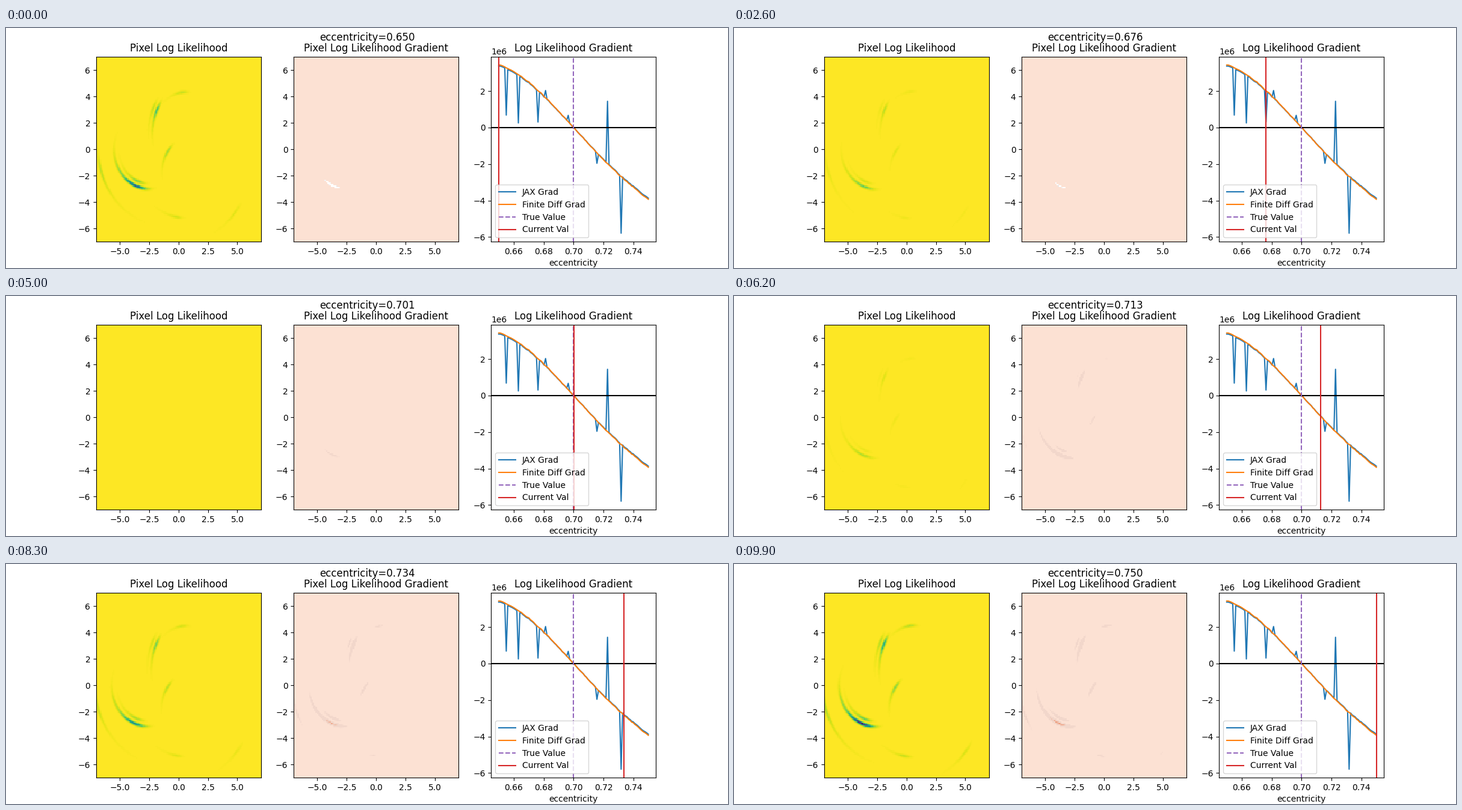
Recreate the animation shown at these times as a matplotlib script. Size 1200x400 px, loop 10 s.

```python
import numpy as np
import matplotlib.pyplot as plt
from matplotlib.animation import FuncAnimation
from matplotlib.colors import LinearSegmentedColormap

FRAMES = 100
TRUE_ECC = 0.7
GRID, HALF = 128, 7.0
THICK = 0.075
PX = 72 / 100  # one pixel in points

ecc = np.linspace(0.65, 0.75, FRAMES)
offset = (ecc - TRUE_ECC) / 0.05

rng = np.random.default_rng(4)
grain = rng.uniform(0.85, 1.1, (GRID, GRID))
centres = (np.arange(GRID) + 0.5) / GRID * 2 * HALF - HALF
X, Y = np.meshgrid(centres, centres)

# Circular arcs: centre x, centre y, radius, brightest angle, span, strength.
# The sign of the span tells on which side the long tail lies.
ARCS = [
    (-2.55, 0.0, 3.07, 248, 15, 1.0),
    (-2.55, 0.0, 2.66, 248, 12, 0.25),
    (2.71, 1.07, 5.0, 157, -6, 0.4),
    (2.71, 1.07, 5.35, 157, -6, 0.12),
    (1.55, -1.83, 3.0, 146, -9, 0.2),
    (-1.0, 0.0, 5.98, 197, -12, 0.13),
    (0.5, -1.2, 4.1, 260, 7, 0.09),
    (0.0, -1.0, 6.27, 321, 6, 0.06),
    (0.7, 1.5, 2.94, 98, -9, 0.12),
]


def arc_light(x, y, cx, cy, radius, angle, span, strength):
    dx, dy = x - cx, y - cy
    turn = (np.degrees(np.arctan2(dy, dx)) - angle + 180) % 360 - 180
    t = turn / span
    core = np.exp(-t ** 2)
    along = np.where(t < 0, 0.6 * core + 0.4 * np.exp(-(t / 3) ** 2), core)
    across = np.exp(-((np.hypot(dx, dy) - radius) / THICK) ** 2 / 2)
    return strength * along * across


def panels(i):
    """Both pixel maps; the arcs grow slightly with eccentricity."""
    u = offset[i]
    scale = 1 + 0.0225 * u
    x, y = X / scale, Y / scale
    field = grain * np.max([arc_light(x, y, *a) for a in ARCS], axis=0)
    peak = 0.86 + 0.11 * np.sign(u)
    like = peak * abs(u) ** 1.5 * field
    return like, np.sign(u) * abs(u) ** 0.5 * field


# Gradient curves, in units of 1e6
finite = -4.17 * np.sin(1.08 * offset) - 0.25 * offset ** 4
finite += rng.normal(0, 0.012, FRAMES)
jax_grad = finite + 0.06 * offset
spikes = {5: 0.68, 13: 0.25, 26: 0.30, 31: 2.03, 46: 0.67, 65: -1.96,
          72: 1.44, 81: -5.79}
jax_grad[list(spikes)] = list(spikes.values())

peach, dusty, orange = "#fce1d3", "#f2d7cb", "#ee9673"
stops = [(-1, "white"), (-0.54, "white"), (-0.48, "#e9e7e9"), (-0.45, peach),
         (0.05, peach), (0.08, dusty), (0.52, dusty), (1, orange)]
grad_map = LinearSegmentedColormap.from_list(
    "grad", [((v + 1) / 2, c) for v, c in stops], N=512)

fig, (ax_like, ax_grad, ax_line) = plt.subplots(1, 3, figsize=(12, 4), dpi=100)
title = fig.suptitle("", y=0.98 + 1 / 400)


def head(ax, name):
    ax.set_title(name, pad=6 + PX)


def image(ax, name, data, cmap, vmin):
    head(ax, name)
    return ax.imshow(data, cmap=cmap, vmin=vmin, vmax=1, origin="lower",
                     extent=[-HALF, HALF, -HALF, HALF], aspect="auto",
                     interpolation="nearest")


like, grad = panels(0)
like_im = image(ax_like, "Pixel Log Likelihood", like, "viridis_r", 0)
grad_im = image(ax_grad, "Pixel Log Likelihood Gradient", grad, grad_map, -1)

head(ax_line, "Log Likelihood Gradient")
ax_line.plot(ecc, jax_grad * 1e6, label="JAX Grad")
ax_line.plot(ecc, finite * 1e6, label="Finite Diff Grad")
ax_line.axhline(0, color="black")
ax_line.axvline(TRUE_ECC, color="C4", ls="--", label="True Value")
current = ax_line.axvline(ecc[0], color="C3", label="Current Val")
ax_line.set_xlim(0.645, 0.755)
ax_line.set_ylim(-6.25e6, 3.876e6)
ax_line.set_xlabel("eccentricity")
ax_line.legend(loc="lower left")


def update(i):
    like, grad = panels(i)
    like_im.set_data(like)
    grad_im.set_data(grad)
    current.set_xdata([ecc[i], ecc[i]])
    title.set_text(f"eccentricity={ecc[i]:.3f}")
    return like_im, grad_im, current, title


anim = FuncAnimation(fig, update, frames=FRAMES, interval=100, repeat=True)
plt.show()
```
